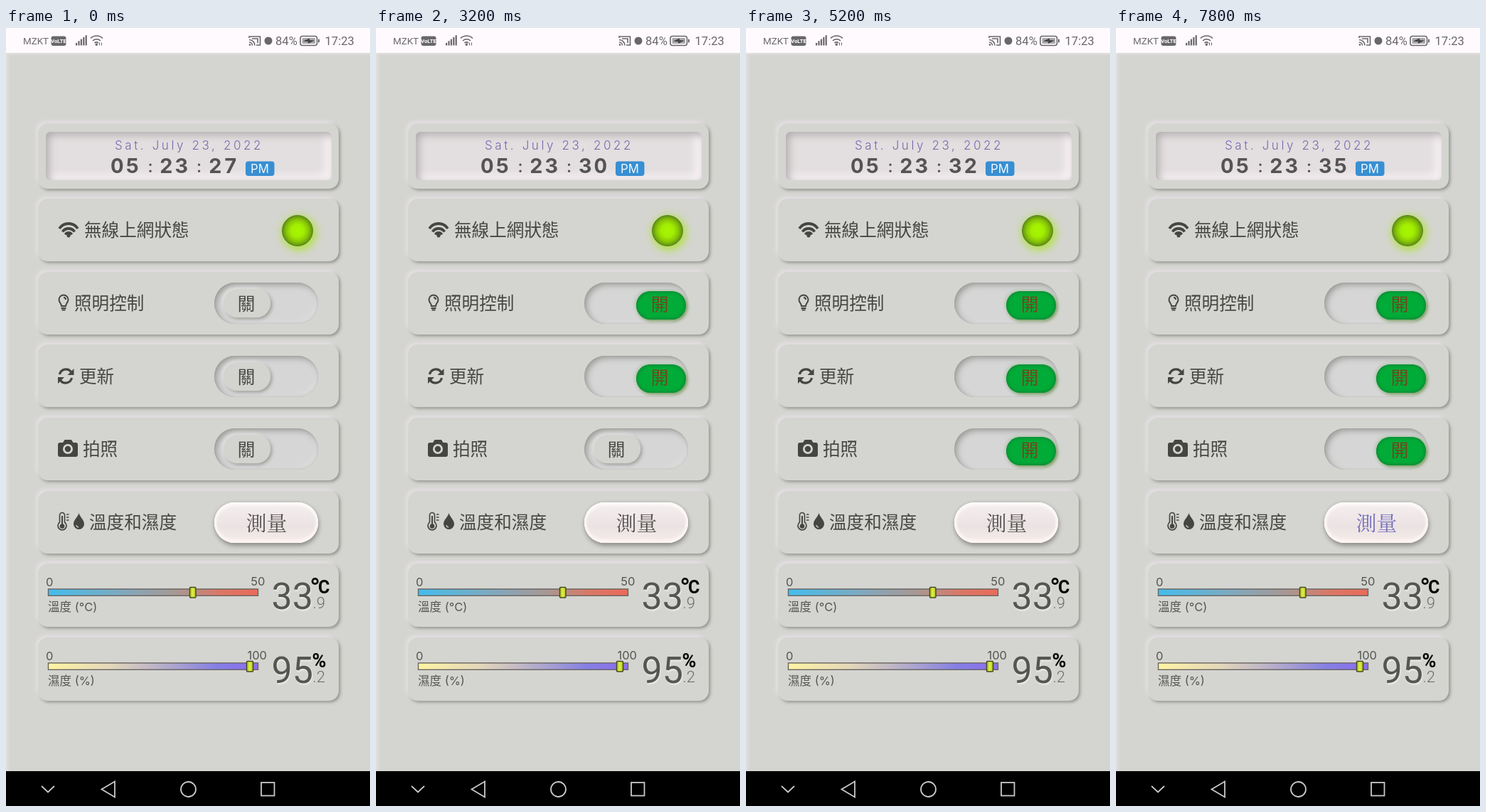
An HTML page for the animation above (8000 ms loop, 512x1094 px).

```html
<!DOCTYPE html>
<html lang="zh-Hant">
<head>
<meta charset="utf-8">
<title>Home panel</title>
<style>
html, body { margin: 0; width: 100%; height: 100%; overflow: hidden; background: #d4d5d0; }
#stage { position: relative; width: 512px; height: 1094px; overflow: hidden; background: #d4d5d0;
  box-shadow: inset 4px 0 4px -1px #e1dfe1; }
#stage div { position: absolute; box-sizing: border-box; }
#stage svg { position: absolute; left: 0; top: 0; }
.top { left: 0; top: 0; width: 512px; height: 35px; background: #fffafd; box-shadow: 0 1px 3px #e9e4e6; }
.nav { left: 0; top: 1045px; width: 512px; height: 49px; background: #000; }
.card { left: 45px; width: 423px; border-radius: 14px; background: #d4d5d0;
  box-shadow: -3px -3px 5px #e5dfe4, 2px 2px 4px #8d8e89; }
.clock { left: 56px; top: 146px; width: 402px; height: 68px; border-radius: 6px; background: #e3dedf;
  box-shadow: inset 4px 4px 12px #b0acad, inset -8px -6px 12px #fcf5f8; }
.led { left: 388px; top: 263px; width: 44px; height: 44px; border-radius: 50%;
  background: radial-gradient(circle closest-side, #a8f500 0, #a2ee02 42%, #87c409 75%, #5f920f 100%);
  border: 1px solid #5b8220; box-shadow: 2px 3px 12px 2px #b0e23c; }
.track { left: 293px; width: 146px; height: 58px; border-radius: 29px; background: #d5d6d5;
  box-shadow: inset 3px 3px 8px #999a97, inset -3px -3px 6px #e3e1e3, inset 0 0 2px #77787a; }
.knob { height: 40px; border-radius: 20px; text-align: center; }
.knob, .label { font-family: "Noto Sans CJK TC", "Noto Sans CJK HK", "Noto Sans CJK JP", "Noto Sans CJK", sans-serif; font-size: 24.6px; }
.button { left: 293px; top: 667px; width: 146px; height: 57px; border-radius: 29px;
  background: linear-gradient(#f6efef, #ebe3e3 60%, #f5ebea);
  box-shadow: inset 0 4px 4px #fffafa, inset 0 -4px 5px #fff5f3, inset 0 0 3px 3px #faf4f4, 1px 4px 6px #8f8f8b, 0 0 4px #b9b6b5; }
text { font-family: Inter, "Noto Sans CJK TC", "Noto Sans CJK HK", "Noto Sans CJK JP", sans-serif; fill: #555652; }
.status text { font-family: Roboto, sans-serif; fill: #68676a; }
text.label { fill: #464743; }
text.big { font-family: Roboto, sans-serif; font-weight: 400; font-size: 52px; text-shadow: 1px 2px 2px #eeecee; }
text.frac { font-family: Roboto, sans-serif; font-weight: 300; font-size: 22px; fill: #6d6e6b; }
text.unit { font-family: Roboto, sans-serif; font-weight: 700; fill: #080808; }
text.time { font-weight: 700; font-size: 28.8px; letter-spacing: 3px; font-variant-numeric: tabular-nums; fill: #555354; }
text.colon { font-weight: 500; font-size: 24px; }
text.measure { font-family: "Noto Serif CJK TC", "Noto Serif CJK JP", "Noto Sans CJK TC", "Noto Sans CJK JP", serif; font-size: 28.8px; }
</style>
</head>
<body>
<div id="stage">
  <div class="top"></div>
  <div class="nav"></div>
  <svg id="art" width="512" height="1094" viewBox="0 0 512 1094">
    <defs>
      <linearGradient id="warm">
        <stop offset="0" stop-color="#43bdec"/><stop offset=".35" stop-color="#7fa9bf"/>
        <stop offset=".62" stop-color="#a99792"/><stop offset=".82" stop-color="#dc7766"/>
        <stop offset="1" stop-color="#e96b59"/>
      </linearGradient>
      <linearGradient id="damp">
        <stop offset="0" stop-color="#fff4a2"/><stop offset=".3" stop-color="#e2d7ba"/>
        <stop offset=".55" stop-color="#b5adca"/><stop offset=".8" stop-color="#8580e4"/>
        <stop offset="1" stop-color="#8c6cf0"/>
      </linearGradient>
      <linearGradient id="mark">
        <stop offset="0" stop-color="#9db81c"/><stop offset=".5" stop-color="#e3f24a"/><stop offset="1" stop-color="#a9be20"/>
      </linearGradient>
      <linearGradient id="dateInk" x1="0" x2="0" y1="0" y2="1">
        <stop offset="0" stop-color="#7a68c6"/><stop offset="1" stop-color="#6f6b98"/>
      </linearGradient>
    </defs>

    <!-- status bar -->
    <g class="status" fill="#68676a">
      <text x="24" y="23" font-size="13.4">MZKT</text>
      <rect x="63.5" y="11.5" width="21" height="13.5" rx="3"/>
      <text x="74" y="21" font-size="7.8" font-weight="700" text-anchor="middle" style="fill:#fff">VoLTE</text>
      <g id="signal"></g>
      <g fill="none" stroke="#68676a" stroke-width="1.6">
        <path d="M119 14.5A12 12 0 0 1 136 14.5M122 18A8 8 0 0 1 133 18M124.5 21A4.5 4.5 0 0 1 130 21"/>
        <path d="M342 14V12H357.5V24H352M342 16.5A8 8 0 0 1 350 24.5M342 20A4.5 4.5 0 0 1 346.5 24.5M346 15H354V21"/>
        <rect x="414" y="11.5" width="23.5" height="13" rx="3"/>
      </g>
      <circle cx="127.3" cy="23.3" r="1.7"/>
      <path d="M131.5 24.5V20.5M134.5 20.5V24.5" stroke="#68676a"/>
      <circle cx="343" cy="23.6" r="1.3"/>
      <circle cx="369" cy="18" r="5.5"/>
      <rect x="416.5" y="14" width="18.5" height="8" rx="1" fill="#a8a7a9"/>
      <path d="M418 18.5L427 14.5V17L434 17.5L425 22V19.3Z" fill="#454446"/>
      <rect x="439" y="15.5" width="2" height="5" rx="1"/>
      <text x="379" y="24" font-size="16.6">84%</text>
      <text x="448.5" y="24" font-size="16.6">17:23</text>
    </g>

    <!-- clock -->
    <text x="257.5" y="171" font-size="17" font-weight="300" letter-spacing="3.6" text-anchor="middle" style="fill:url(#dateInk)">Sat. July 23, 2022</text>
    <g text-anchor="middle">
      <text class="time" x="168.5" y="204">05</text>
      <text class="time colon" x="204.5" y="203">:</text>
      <text class="time" x="237.5" y="204">23</text>
      <text class="time colon" x="273" y="203">:</text>
      <text class="time" id="sec" x="306.500" y="204">27</text>
    </g>
    <rect x="337" y="187.500" width="40.500" height="20.500" rx="4" fill="#378fd2"/>
    <text x="357" y="203.700" font-size="16.800" text-anchor="middle" style="fill:#f2f6fa">PM</text>

    <!-- row labels -->
    <text class="label" x="110" y="293">無線上網狀態</text>
    <text class="label" x="96" y="396">照明控制</text>
    <text class="label" x="103" y="498.5">更新</text>
    <text class="label" x="108" y="601">拍照</text>
    <text class="label" x="117" y="703.5">溫度和濕度</text>

    <!-- row icons -->
    <g fill="none" stroke="#454642">
      <path stroke-width="3.8" d="M75 282A15.6 15.6 0 0 1 101 282M79.5 286.500A10.300 10.300 0 0 1 96.500 286.500M83.500 290.500A5.300 5.300 0 0 1 92.500 290.500"/>
      <path stroke-width="2" d="M78 391C78 387.5 74.5 386 74.5 382A6.3 6.3 0 0 1 87.5 382C87.5 386 84 387.5 84 391ZM77.5 394H84.5M78.5 396.5H83.5M81 379A3 3 0 0 1 84 382"/>
      <path stroke-width="3.2" d="M75.5 487A9 9 0 0 1 91.5 483.5M92.5 492A9 9 0 0 1 76.5 495.5"/>
      <path stroke-width="1.7" d="M75.5 695V685A3.5 3.5 0 0 1 82.5 685V695A6 6 0 1 1 75.5 695ZM85 684H88.5M85 688H88.5M85 692H88.5"/>
      <path stroke-width="2" d="M79 686V699"/>
    </g>
    <g fill="#454642">
      <circle cx="88" cy="292" r="2.5"/>
      <path d="M95.5 479V488H86.5ZM73 500V491H82Z"/>
      <circle cx="79" cy="700.5" r="3.3"/>
      <path d="M102.5 682C104 688 110 691.5 110 697.5A7.5 7.5 0 0 1 95 697.5C95 691.5 101 688 102.5 682Z"/>
      <path d="M76 583H80L82.5 579H92L94.5 583H98Q101 583 101 586V600Q101 603 98 603H76Q73 603 73 600V586Q73 583 76 583Z"/>
    </g>
    <circle cx="87" cy="592" r="5.6" fill="none" stroke="#d4d5d0" stroke-width="2.8"/>
    <path d="M99 699A3.5 3.5 0 0 0 102 702" fill="none" stroke="#d4d5d0" stroke-width="1.3"/>

    <text class="measure" id="measure" x="366.5" y="706.5" text-anchor="middle">測量</text>

    <!-- gauges -->
    <g stroke="#6a6563" stroke-width="1.4">
      <rect x="59.5" y="788.9" width="295" height="9.4" fill="url(#warm)"/>
      <rect x="59.5" y="892.9" width="295" height="9.4" fill="url(#damp)"/>
      <g stroke="#454720" fill="url(#mark)">
        <rect x="258.5" y="786.5" width="8.5" height="14.5" rx="1"/>
        <rect x="338.5" y="890.5" width="9" height="14.5" rx="1"/>
      </g>
    </g>
    <g font-size="16.5">
      <text x="56" y="785">0</text>
      <text x="364.5" y="784" text-anchor="end">50</text>
      <text x="59" y="820">溫度 (°C)</text>
      <text x="56" y="889">0</text>
      <text x="367" y="888" text-anchor="end">100</text>
      <text x="59" y="924">濕度 (%)</text>
    </g>
    <text class="big" x="373.5" y="817">33</text>
    <text class="big" x="373.5" y="921">95</text>
    <text class="frac" x="431.5" y="816">.9</text>
    <text class="frac" x="431.5" y="920">.2</text>
    <circle cx="434.7" cy="778" r="3.7" fill="none" stroke="#080808" stroke-width="2.7"/>
    <text class="unit" x="439" y="794.5" font-size="25">C</text>
    <text class="unit" x="430.5" y="898.5" font-size="27">%</text>

    <!-- navigation -->
    <g fill="none" stroke="#c9c9c9" stroke-width="1.8">
      <path d="M50 1066L59 1074.5L68 1066M153 1059.5V1081.5L134.5 1070.5Z"/>
      <circle cx="256.5" cy="1070.5" r="10.5"/>
      <rect x="359" y="1061" width="18.5" height="18.5"/>
    </g>
  </svg>
</div>
<script>
const LOOP = 8000;
const stage = document.getElementById('stage');
const art = document.getElementById('art');
const sec = document.getElementById('sec');
const measure = document.getElementById('measure');

function box(className, top, height) {
  const el = document.createElement('div');
  el.className = className;
  if (top !== undefined) el.style.top = top + 'px';
  if (height) el.style.height = height + 'px';
  stage.insertBefore(el, art);
  return el;
}

const cards = [[134, 92], [240, 88], [343, 88], [445, 88], [548, 88], [651, 88], [753, 89], [857, 89]];
cards.forEach(([top, height]) => box('card', top, height));
['clock', 'led', 'button'].forEach(name => box(name));

const switches = [[358, 1800], [461, 2700], [563, 3850]].map(([top, start]) => {
  box('track', top);
  return { top, start, knob: box('knob') };
});

document.getElementById('signal').innerHTML = [0, 1, 2, 3, 4].map(i =>
  `<rect x="${98 + i * 3.4}" y="${21 - i * 2.7}" width="2.2" height="${3.5 + i * 2.7}"/>`).join('');

const mix = (a, b, p) => a + (b - a) * p;
const mixColor = (a, b, p) => `rgb(${a.map((v, i) => Math.round(mix(v, b[i], p)))})`;
function ease(t, start, length) {
  const p = Math.min(1, Math.max(0, (t - start) / length));
  return p * p * (3 - 2 * p);
}

function drawSwitch({ top, start, knob }, t) {
  const p = ease(t, start, 350);
  const s = knob.style;
  s.left = mix(306, 366, p) + 'px';
  s.top = top + mix(9, 12, p) + 'px';
  s.width = mix(66, 70, p) + 'px';
  s.background = mixColor([211, 212, 207], [0, 171, 56], p);
  s.color = mixColor([72, 73, 69], [116, 70, 28], p);
  s.boxShadow = `-2px -2px 4px ${mixColor([226, 224, 225], [184, 200, 184], p)}, ` +
    `2px 2px 5px ${mixColor([150, 151, 147], [110, 150, 80], p)}, ` +
    `inset 0 0 4px 1px ${mixColor([211, 212, 207], [22, 128, 52], p)}`;
  s.lineHeight = mix(38, 34, p) + 'px';
  s.textIndent = mix(-2, -4, p) + 'px';
  knob.textContent = p < 0.5 ? '關' : '開';
}

function render(t) {
  sec.textContent = 27 + Math.floor((t + 400) / 1000);
  switches.forEach(item => drawSwitch(item, t));
  measure.style.fill = mixColor([85, 83, 81], [119, 113, 188], ease(t, 6200, 250));
}

const began = performance.now();
function tick() {
  render((performance.now() - began) % LOOP);
  requestAnimationFrame(tick);
}
render(0);
requestAnimationFrame(tick);
</script>
</body>
</html>
```
